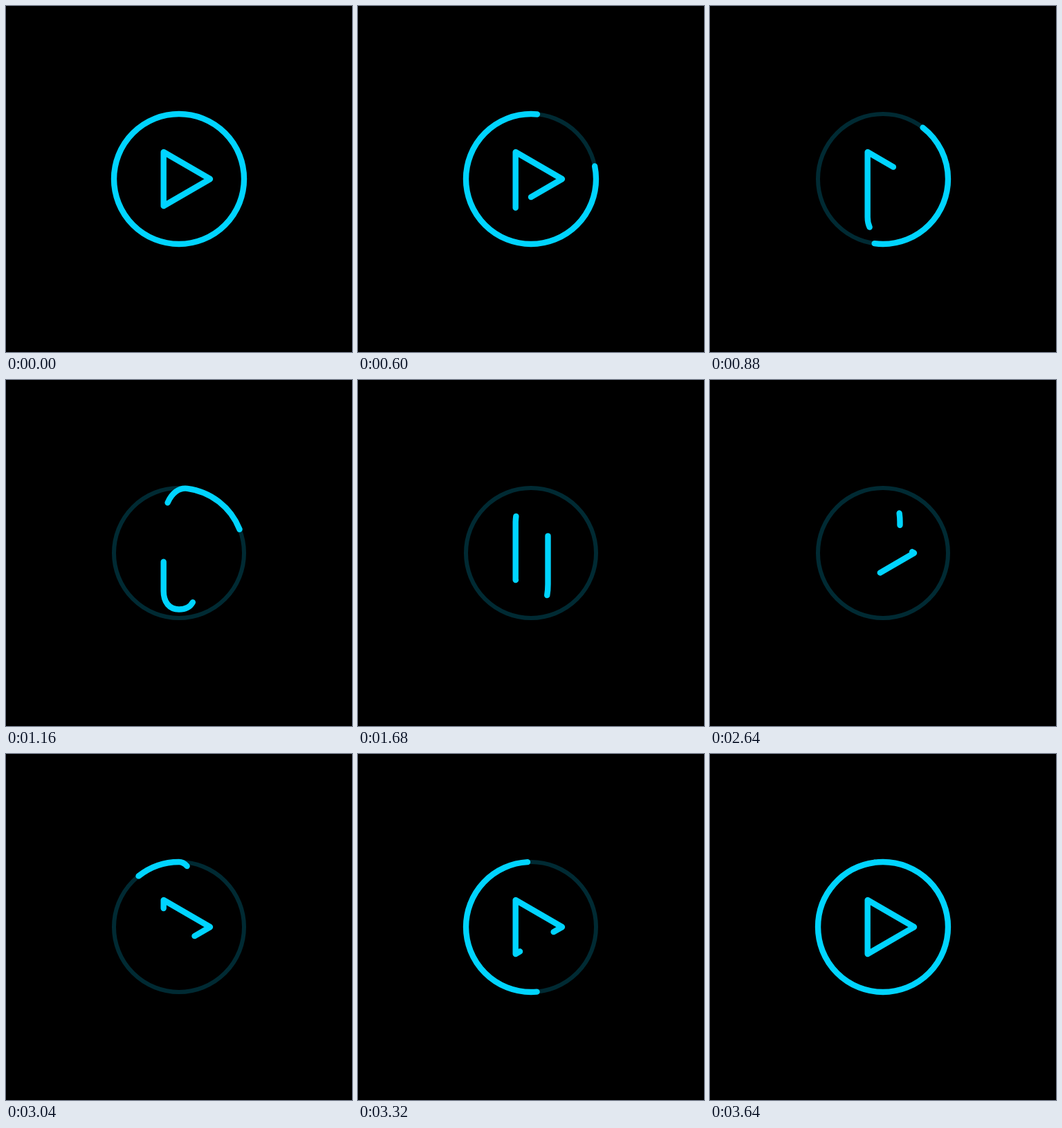
These frames come from a looping animation (500 by 500 pixels, 4.8 s). An HTML page:

```html
<!DOCTYPE html>
<html lang="en">
<head>
<meta charset="utf-8">
<title>Play and pause</title>
<style>
  html, body { margin: 0; height: 100%; overflow: hidden; background: #000; }
  svg { display: block; width: 100vw; height: 100vh; }
  path, circle { fill: none; stroke: #00d4ff; stroke-width: 8.4; stroke-linecap: round; stroke-linejoin: round; }
  circle { stroke: #002a33; stroke-width: 6; }
</style>
</head>
<body>
<svg viewBox="0 0 500 500">
  <circle cx="250" cy="250" r="94"/>
  <!-- ring, left bar, triangle -->
  <path id="left" d="M344 250 A94 94 0 0 0 156 250 A94 94 0 0 0 344 250 A94 94 0 0 0 262 156.8
    C244 154.5 229 174 227.7 205 V289 L295 250 L227.7 211 V289 L295 250"/>
  <!-- triangle, right bar, ring -->
  <path id="right" d="M227.7 289 L295 250 L227.7 211 V305 C227.7 321 236 331.5 250 331.5
    C268 331.5 274.5 320 274.5 295 V205 C274.5 180 264 156 250 156
    A94 94 0 0 0 250 344 A94 94 0 0 0 250 156 A94 94 0 0 0 156 250"/>
</svg>
<script>
const LOOP = 4800, END = 3640;
const RING = 2 * Math.PI * 94, TRIANGLE = 233;

// Cubic Bezier easing with handles (x1, 0) and (x2, 1), solved by bisection.
function ease(x, x1, x2) {
  if (x <= 0 || x >= 1) return x <= 0 ? 0 : 1;
  let low = 0, high = 1, s;
  for (let i = 0; i < 24; i++) {
    s = (low + high) / 2;
    const r = 1 - s;
    if (3 * s * r * r * x1 + 3 * s * s * r * x2 + s ** 3 < x) low = s;
    else high = s;
  }
  return s * s * (3 - 2 * s);
}

const leg = (start, end, distance, x1, x2) =>
  time => distance * ease((time - start) / (end - start), x1, x2);

// Position along a path: a starting point plus two eased moves.
const travel = (from, toPause, toPlay) => time => from + toPause(time) + toPlay(time);

const strokes = [
  {
    path: document.getElementById('left'),
    tail: travel(0, leg(400, 1920, 797, 0.16, 0.29), leg(1920, END, 146, 0.05, 0.38)),
    head: travel(RING, leg(400, 1740, 286.4, 0.33, 0.67), leg(1740, END, 299.5, 0.545, 0.857))
  },
  {
    path: document.getElementById('right'),
    tail: travel(0, leg(400, 2040, 345, 0.24, 0.49), leg(2040, END, 155, 0.22, 0.43)),
    head: travel(TRIANGLE, leg(480, 2040, 206, 0.35, 0.69), leg(2560, END, 652, 0.72, 0.77))
  }
];

function draw() {
  const time = performance.now() % LOOP;
  for (const { path, tail, head } of strokes) {
    const start = tail(time);
    path.style.strokeDasharray = `${head(time) - start} 3000`;
    path.style.strokeDashoffset = -start;
  }
  requestAnimationFrame(draw);
}
draw();
</script>
</body>
</html>
```
